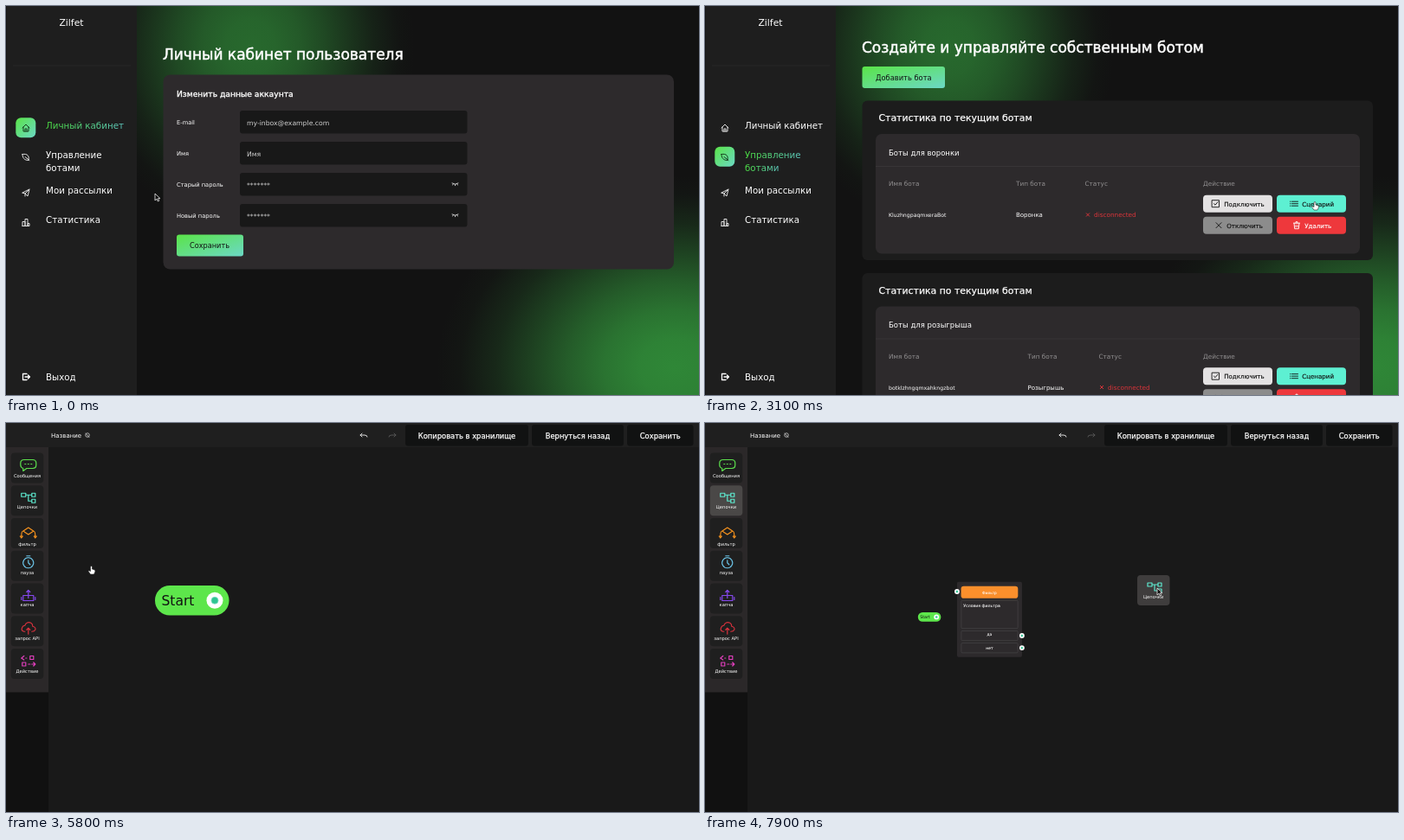
Recreate the animation shown at these times as an HTML page. Size 800 px wide and 450 px high, loop 8000 ms.

```html
<!DOCTYPE html>
<html lang="ru">
<head>
<meta charset="utf-8">
<title>Bot dashboard</title>
<style>
  html, body { margin: 0; width: 100%; height: 100%; overflow: hidden; background: #121212; }
  svg { display: block; width: 800px; height: 450px; }
  text { font-family: "DejaVu Sans", Verdana, sans-serif; white-space: pre; }
  .line { fill: none; stroke-width: 1; stroke-linejoin: round; stroke-linecap: round; }
</style>
</head>
<body>
<svg id="stage" viewBox="0 0 800 450" xmlns="http://www.w3.org/2000/svg"></svg>
<script>
const LOOP = 8000, STEP = 100;
const PANEL = '#2d2a2c', DARK = '#181818', SLATE = '#35343b';

// ---- drawing helpers ----
const rect = (x, y, w, h, fill, r = 0, more = '') =>
  `<rect x="${x}" y="${y}" width="${w}" height="${h}" rx="${r}" fill="${fill}" ${more}/>`;
const text = (x, y, size, str, fill = '#fff', bold = 0, more = '') =>
  `<text x="${x}" y="${y}" font-size="${size}" fill="${fill}" stroke="${fill}" stroke-width="${bold}" ${more}>${str}</text>`;
const mid = (x, y, size, str, fill, bold) => text(x, y, size, str, fill, bold, 'text-anchor="middle"');
const line = (d, color = '#ddd', width = 1) =>
  `<path class="line" d="${d}" stroke="${color}" style="stroke-width:${width}"/>`;
const dot = (x, y, r, fill, more = '') => `<circle cx="${x}" cy="${y}" r="${r}" fill="${fill}" ${more}/>`;
const ring = (x, y, r, color, width = 1) => dot(x, y, r, 'none', `stroke="${color}" stroke-width="${width}"`);
const at = (x, y, body, id = '') => `<g ${id && `id="${id}"`} transform="translate(${x} ${y})">${body}</g>`;
const heading = (y, str) => text(181, y, 17, str, '#fff', .5);

// soft blurred disc: opacity falls along a smooth bell
const bell = [0, .15, .3, .45, .6, .75, .9, 1].map(p =>
  `<stop offset="${p}" stop-color="#2f8737" stop-opacity="${((1 - p * p) ** 2).toFixed(3)}"/>`).join('');
const defs = `<defs>
  <linearGradient id="mint" x2="1" y2="1"><stop stop-color="#5ae447"/><stop offset="1" stop-color="#6cd8c6"/></linearGradient>
  <linearGradient id="link"><stop stop-color="#49d93f"/><stop offset="1" stop-color="#5cc3ba"/></linearGradient>
  <radialGradient id="glow">${bell}</radialGradient>
</defs>`;

// ---- dashboard frame ----
const menuIcons = [
  'M-4 0L0-4L4 0M-3-1V4H3V-1M-1 4V1H1V4',
  'M-4-3C2-4 4-1 3 4C-2 4-4 1-4-3ZM-1 0L4 4',
  'M-4 0L4-4L2 4L-1 1ZM4-4L-1 1V4',
  'M-4 4V-1H-1V4M-1 4V-4H2V4M2 4V1H4V4H-4'
];
const menu = [
  [141, [['Личный кабинет', 141.5]]],
  [174.5, [['Управление', 175.5], ['ботами', 190.5]]],
  [216, [['Мои рассылки', 217]]],
  [250.5, [['Статистика', 251]]]
];
const menuText = (row, fill) => row[1].map(([s, y]) => text(46, y, 10.3, s, fill)).join('');
const backdrop = rect(0, 0, 800, 450, '#121212') +
  '<ellipse cx="282" cy="48" rx="190" ry="215" fill="url(#glow)" opacity=".74"/>' +
  '<ellipse cx="772" cy="418" rx="275" ry="222" fill="url(#glow)"/>';
const sidebar = rect(0, 0, 151, 450, '#1e1e1e') + rect(0, 0, 1, 450, '#151515') +
  rect(8, 68.5, 136, 1, '#262626') + mid(75.5, 23.3, 10.8, 'Zilfet') +
  menu.map((row, i) => `<g id="menu${i}">` +
    rect(11.3, row[0] - 11.7, 23, 23, 'url(#mint)', 6, `id="box${i}"`) +
    at(23, row[0], `<path id="icon${i}" class="line" d="${menuIcons[i]}"/>`) +
    `<g id="label${i}">${menuText(row, '#fff')}</g></g>`).join('') +
  at(23, 429, line('M1-3.5H-3.5V3.5H1M-1 0H4.5M2.5-2L4.5 0L2.5 2', '#fff', 1.3)) +
  text(46, 433, 10.3, 'Выход');

// ---- account page ----
const fields = [
  ['E-mail', 'my-inbox@example.com'], ['Имя', 'Имя'],
  ['Старый пароль', '*******'], ['Новый пароль', '*******']
];
const eye = line('M-3.500-1Q0 1.500 3.500-1M-2.300 0L-2.800 1M0 .500V1.700M2.300 0L2.800 1', '#ddd', .9);
const account = heading(61.6, 'Личный кабинет пользователя') + rect(181.5, 79.5, 589.5, 225, PANEL, 8) +
  text(197, 104.5, 9.2, 'Изменить данные аккаунта', '#fff', .35) +
  fields.map(([name, value], i) => {
    const y = 121 + i * 36;
    return text(197, y + 16, 6.7, name) + rect(270, y, 262.5, 26.5, DARK, 3) +
      text(278, y + 16.5, 7.7, value, '#d0d0d0') + (i > 1 ? at(518.5, y + 13, eye) : '');
  }).join('') +
  rect(197, 264.5, 77, 25, 'url(#mint)', 3) + mid(235, 280, 8.2, 'Сохранить', '#111');

// ---- bot list ----
const actions = [
  ['Подключить', '#e4e2e3', '#111', 'M-4-4H4V4H-4ZM-2 0L-.5 1.5L2.5-2'],
  ['Сценарий', '#5df0d2', '#111', 'M-4-2.5H-3.5M-2-2.5H5M-4 0H-3.5M-2 0H5M-4 2.5H-3.5M-2 2.5H5'],
  ['Отключить', '#8c8c8c', '#111', 'M-3-3L3 3M3-3L-3 3'],
  ['Удалить', '#ee383c', '#fff', 'M-3.5-2.5H3.5M-3-2.5L-2.3 4H2.3L3-2.5M-1-2.5V-4H1V-2.5M-1 0V2M1 0V2']
];
const action = ([name, bg, ink, icon], i) => {
  const x = 575 + i % 2 * 85, y = 218.7 + (i >> 1) * 25;
  const ix = x + (i % 2 ? (i > 1 ? 23 : 19.5) : (i > 1 ? 18 : 14.5));
  return rect(x, y, 80, 20, bg, 4) + at(ix, y + 10, line(icon, ink, .9)) +
    text(ix + (i < 2 ? 9.7 : 9.2), y + 13, 7.1, name, ink, .15);
};
const botGroup = (group, bot, type, typeX, statusX) =>
  rect(181.5, 109.5, 589.5, 184.5, '#1c1c1c', 6) +
  text(200.5, 133, 10.9, 'Статистика по текущим ботам', '#fff', .25) +
  rect(197, 148, 559, 138.5, PANEL, 7) + text(212, 172.5, 8.5, group) + rect(197, 185, 559, 1, '#383537') +
  [['Имя бота', 212], ['Тип бота', typeX], ['Статус', statusX], ['Действие', 575]]
    .map(([s, x]) => text(x, 208, 7.3, s, '#918f90')).join('') +
  text(212, 244, 6.2, bot) + text(typeX, 244, 7, type) +
  at(statusX + 3.5, 241.5, line('M-1.7-1.7L1.7 1.7M1.7-1.7L-1.7 1.7', '#d9343a')) +
  text(statusX + 10.5, 244, 7.3, 'disconnected', '#d9343a') + actions.map(action).join('');
const bots = heading(53.6, 'Создайте и управляйте собственным ботом') +
  rect(181.5, 70, 95.5, 25, 'url(#mint)', 3) + mid(229.3, 85.5, 8.3, 'Добавить бота', '#111') +
  botGroup('Боты для воронки', 'KluzhngpaqmxeraBot', 'Воронка', 359, 438.5) +
  at(0, 199.5, botGroup('Боты для розыгрыша', 'botklzhngqmxahkngzbot', 'Розыгрышь', 372.5, 454.5));

// ---- statistics ----
const totals = [['подписчиков', 'всего'], ['подписчиков', 'активных'], ['подписчиков', 'за сегодня'],
  ['сессий', 'за сегодня'], ['отправлено', 'всего']];
const stats = heading(53.6, 'Статистика ботов') + rect(181.5, 70, 589.5, 151, PANEL, 8) +
  text(197, 94, 6.8, 'Выберите бота для просмотра статистики') +
  rect(197, 108, 559, 98.5, 'url(#mint)', 7) + rect(206, 117, 91.5, 24.5, '#161616', 3) +
  mid(251.7, 132, 7.9, 'Lesenka_demo_bot') +
  totals.map(([a, b], i) => {
    const x = 206 + i * 75.6;
    return text(x, 163, 14, '2', '#151515') + text(x, 179, 9.5, a, '#151515', .1) + text(x, 193, 9.5, b, '#151515', .1);
  }).join('');

// ---- scenarios ----
const gear = (x, y, r) => ring(x, y, r, '#ddd', .9) + ring(x, y, r * .45, '#ddd', .8);
const scenarios = heading(53.6, 'Сценарии ботов') + line('M187.5 75L185 77.5L187.5 80') +
  text(196.5, 80.5, 7, 'Вернуться к выбору бота') + rect(181.5, 98, 589.5, 360, '#1b1b1b', 6) +
  text(200.5, 129, 9.4, 'Ваш бот:', '#3fc244') + text(247, 129, 9.4, 'lesenkademo') +
  rect(294, 142, 114, 25, '#1d1d1d', 4) + rect(201, 142, 87, 32, PANEL, 5) + rect(201, 167, 551, 281, PANEL, 6) +
  gear(214, 155, 3.5) + text(223, 157, 6.9, 'Структура бота') +
  ring(308, 154, 4.5, '#eee', .9) + line('M306 154H310M308 152V156', '#eee', .9) +
  text(316, 157, 7, 'Восстановить цепочку') +
  rect(274, 181, 59, 26, '#171717', 5) + rect(216, 181, 58, 26, SLATE, 5) + rect(216, 202.5, 117, 149.5, SLATE, 6) +
  text(223, 195, 8.4, 'Триггеры', '#fff', .3) + text(287.5, 195, 8.3, 'Цепочки', '#fff', .3) +
  rect(225, 212, 98.5, 21, 'url(#mint)', 3) + mid(274, 225, 6.7, 'Создать новую цепочку', '#111') +
  text(225, 248.5, 6.65, 'Выбрать существующую:') +
  [0, 1, 2, 3].map(i => rect(225.5, 259.7 + i * 20.7, 97.5, 16.3, 'none', 3,
    `stroke="${i ? '#696970' : '#54d95f'}"`) + mid(274.3, 270.7 + i * 20.7, 8, 'ssss', '#eee')).join('') +
  rect(340.5, 202, 396.5, 235, SLATE, 6) + gear(703.5, 219.5, 3) + rect(712, 212, 15, 15, '#c9272d', 3) +
  at(719.5, 219.5, line(actions[3][3], '#fff', .8)) +
  text(350, 235.5, 6.5, 'Создан: 24.03.24') + text(415.5, 235.5, 6.7, 'Обновлена: 24 дня назад') +
  rect(350, 238, 377.5, 190, '#000', 5);

// ---- editor ----
const tools = [
  ['Сообщения', '#5ce04d', 28, 'M-5-6H5Q9-6 9-2V0Q9 4 5 4H-2L-6 7V4Q-9 3-9 0V-2Q-9-6-5-6ZM-4-1H-3M-.5-1H.5M3-1H4'],
  ['Цепочки', '#5eead0', 27, 'M-8-5H-3V-1H-8ZM4-5H8V-1H4ZM4 2H8V6H4ZM-3-3H4M0-3V4H4'],
  ['фильтр', '#f7931e', 31.5, 'M0-6L6-2L0 2L-6-2ZM-6-2Q-8-2-8 4M6-2Q8-2 8 4M-9.5 4H-6.5L-8 6ZM6.5 4H9.5L8 6Z'],
  ['пауза', '#6cc5e8', 27, 'M0-6A6 6 0 1 1-.1-6M0-3V0L2 2M-2-8H2'],
  ['капча', '#8648ee', 26.5, 'M-6 0H6V6H-6ZM0 3V-6M-2-4L0-6L2-4M-8 2V5M8 2V5'],
  ['запрос API', '#d8323e', 27.5, 'M-4 4H-5Q-9 3-7-1Q-6-3-4-3Q-2-8 3-6Q5-5 5-2Q9-1 8 2Q7 4 4 4M0 7V0M-2 2L0 0L2 2'],
  ['Действие', '#e23fbd', 27.5, 'M-8-3L-5-5.5M-8-3L-5-1M-3-3H-2M2-5.5H6V-1.5H2ZM-7 2H-3V6H-7ZM0 4H2M4 4H8L6 2M8 4L6 6']
];
const toolY = i => 34.5 + i * 37.75;
const tool = (i, fill, id = '') => {
  const [name, color, base, icon] = tools[i];
  return rect(0, 0, 37.5, 35, fill, 4, id && `id="${id}"`) +
    at(20, i === 2 ? 17 : 14, line(icon, color, 1.2)) + mid(18.7, base, 5.2, name, '#fff');
};
const port = (x, y) => dot(x, y, 9.5, '#fff') + dot(x, y, 3.8, '#2fc592') + ring(x, y, 4, '#66d9b5', .8);
const startNode = rect(382, 223, 85.5, 34.5, '#5de64b', 17) + text(389.5, 245.5, 15.5, 'Start', '#111') + port(451, 240.3);
const frame = (y, h) => rect(333.5, y, 210.5, h, 'none', 4, 'stroke="#4a484a" stroke-width="2"');
const filterNode = rect(317.5, 74.5, 242, 280, PANEL, 6) + rect(332.5, 90, 212, 45.5, '#fb8f2c', 10) +
  mid(438.5, 118.5, 13.7, 'Фильтр', '#fff', .3) + frame(143.5, 104.5) +
  text(341.5, 169, 15, 'Условия фильтра', '#fff', .25) + frame(257, 36) + mid(438, 275, 14, 'да', '#fff', .3) +
  frame(302.5, 36.5) + mid(438.5, 326, 14.5, 'нет', '#fff', .3) +
  port(317.5, 110.5) + port(559.3, 275) + port(559.3, 320.5);
const topButton = (x, w, s) => rect(x, 2, w, 24.5, '#111212', 3) + mid(x + w / 2, 17.5, 8.35, s, '#fff', .25);
const editor = rect(0, 0, 800, 450, '#191919') +
  `<g id="flow"><g id="start">${startNode}</g><g id="filter">${filterNode}</g></g>` +
  rect(0, 28, 49, 422, '#111') + rect(0, 28, 49, 283.5, '#2b2829') + rect(0, 0, 800, 28, '#1f1f1f') +
  text(52, 16.5, 7, 'Название') + at(94, 14, ring(0, 0, 2.3, '#ccc', .8) + line('M-2-2L2 2.5', '#ccc', .8)) +
  line('M411 12L409 14L411 16M409 14H414Q417 14 417 16', '#ddd') +
  line('M448 12L450 14L448 16M450 14H445Q442 14 442 16', '#555') +
  topButton(461, 142, 'Копировать в хранилище') + topButton(607, 106, 'Вернуться назад') + topButton(717, 76.5, 'Сохранить') +
  tools.map((_, i) => at(5.8, toolY(i), tool(i, '#1f1f1f', 'tool' + i))).join('') +
  at(0, 0, tool(2, '#3f3d3d'), 'ghost2') + at(0, 0, tool(1, '#3f3d3d'), 'ghost1');

const pointers = {
  arrow: '<path d="M0 0V8L2 6.2L3.3 9L4.7 8.4L3.4 5.7H6Z" fill="#111" stroke="#eee" stroke-width=".8"/>',
  hand: '<path d="M-1 0Q0-1 1 0V3L4 4Q5 5 4 7L3 9H-1L-3.5 5.5Q-3 4-1 5.5Z" fill="#fff" stroke="#222" stroke-width=".6"/>',
  grab: '<path d="M-3-1L-2-2.5L-1-1.5L0-3L1-1.5L2-2.5L3 0L2 3.5H-1L-3 1Z" fill="#fff" stroke="#222" stroke-width=".6"/>'
};

const pages = { account, bots, stats, scenarios };
document.getElementById('stage').innerHTML = defs + `<g id="dash">${backdrop}${sidebar}` +
  Object.entries(pages).map(([k, body]) => `<g id="${k}">${body}</g>`).join('') +
  `<g id="status">${rect(0, 442.5, 10, 8, '#2a2a2a', 2, 'id="statusBg"')}<text id="statusText" x="2" y="448.7" font-size="5.1" fill="#d5d5d5"></text></g></g>` +
  `<g id="editor">${editor}</g><g id="cursor">` +
  Object.entries(pointers).map(([k, body]) => `<g id="${k}">${body}</g>`).join('') + '</g>';

// ---- timeline ----
const scenes = [[0, 'account', 0], [600, 'bots', 1], [1600, 'stats', 3], [2400, 'bots', 1], [3300, 'scenarios', -1], [4300, 'editor', -1]];
const hovers = [[0, -1], [300, 1], [1000, 2], [1200, 3], [1900, 2], [2100, 1], [2700, -1]];
const statuses = [[0, ''], [300, 'bot-management'], [1200, 'stats'], [2100, 'bot-management'], [2900, '']];
const shapes = [[0, 'arrow'], [300, 'hand'], [2700, 'arrow'], [3100, 'hand'], [3400, 'arrow'], [4000, 'hand'],
  [4300, 'grab'], [5800, 'hand'], [6000, 'arrow'], [6400, 'grab'], [7200, 'hand'], [7400, 'arrow']];
const path = [[0, 172, 217], [400, 78, 176], [800, 76, 178], [1300, 81, 253], [1700, 81, 252], [2200, 70, 174],
  [2500, 72, 175], [3100, 704, 227], [3400, 704, 227], [4000, 265, 212], [4300, 265, 212], [4900, 378, 242], [5300, 378, 242],
  [5700, 168, 207], [5900, 29, 125], [6000, 29, 125], [6300, 398, 222], [6500, 398, 222], [6700, 279, 233], [7000, 279, 233],
  [7300, 29, 87], [7400, 29, 87], [7800, 522, 191], [8000, 522, 191]];
const pan = [[0, 0, 0], [5300, 0, 0], [5700, -210, -35]];
const zoom = [[0, 1], [6600, 1], [7000, .31]];

const hold = (table, t) => table.filter(k => k[0] <= t).pop();
const glide = (table, t) => {
  const i = table.findIndex(k => k[0] > t);
  if (i < 0) return table[table.length - 1].slice(1);
  const a = table[i - 1], b = table[i], p = (t - a[0]) / (b[0] - a[0]), e = p * p * (3 - 2 * p);
  return a.slice(1).map((v, j) => v + (b[j + 1] - v) * e);
};
const $ = id => document.getElementById(id);
const show = (id, on) => $(id).style.display = on ? '' : 'none';
const move = (id, x, y) => $(id).setAttribute('transform', `translate(${x} ${y})`);

function drawMenu(active, hover) {
  menu.forEach((row, i) => {
    const on = i === active;
    show('box' + i, on);
    $('icon' + i).setAttribute('stroke', on ? '#163f1c' : '#e0e0e0');
    for (const el of $('label' + i).children) {
      el.setAttribute('fill', on ? 'url(#link)' : '#fff');
      el.setAttribute('text-decoration', i === hover ? 'underline' : 'none');
    }
  });
}

function draw(t) {
  const [, scene, active] = hold(scenes, t), editing = scene === 'editor';
  show('dash', !editing);
  show('editor', editing);
  for (const k in pages) show(k, k === scene);
  drawMenu(active, hold(hovers, t)[1]);

  const link = hold(statuses, t)[1];
  show('status', link);
  $('statusText').textContent = 'localhost:5173/dashboard/' + link;
  $('statusBg').setAttribute('width', 4 + (25 + link.length) * 3);

  const [px, py] = glide(pan, t), [z] = glide(zoom, t), [x, y] = glide(path, t);
  move('start', px, py);
  show('filter', t >= 6400);
  $('flow').setAttribute('transform', `translate(279 233) scale(${z}) translate(-279 -233)`);
  const onFilter = t >= 5900 && t <= 6400, onChain = t >= 7300;
  $('tool2').setAttribute('fill', onFilter ? '#3c3a3a' : '#1f1f1f');
  $('tool1').setAttribute('fill', onChain ? '#4a4847' : '#1f1f1f');
  show('ghost2', t >= 6000 && t < 6400);
  show('ghost1', t >= 7400);
  move('ghost1', x - 23, y - 15);
  move('ghost2', x - 23, y - 15);

  move('cursor', x, y);
  const shape = hold(shapes, t)[1];
  for (const k in pointers) show(k, k === shape);
}

const began = performance.now();
function tick(now) {
  const t = Math.max(0, now - began) % LOOP;
  draw(Math.floor(t / STEP) * STEP);
  requestAnimationFrame(tick);
}
draw(0);
requestAnimationFrame(tick);
</script>
</body>
</html>
```
